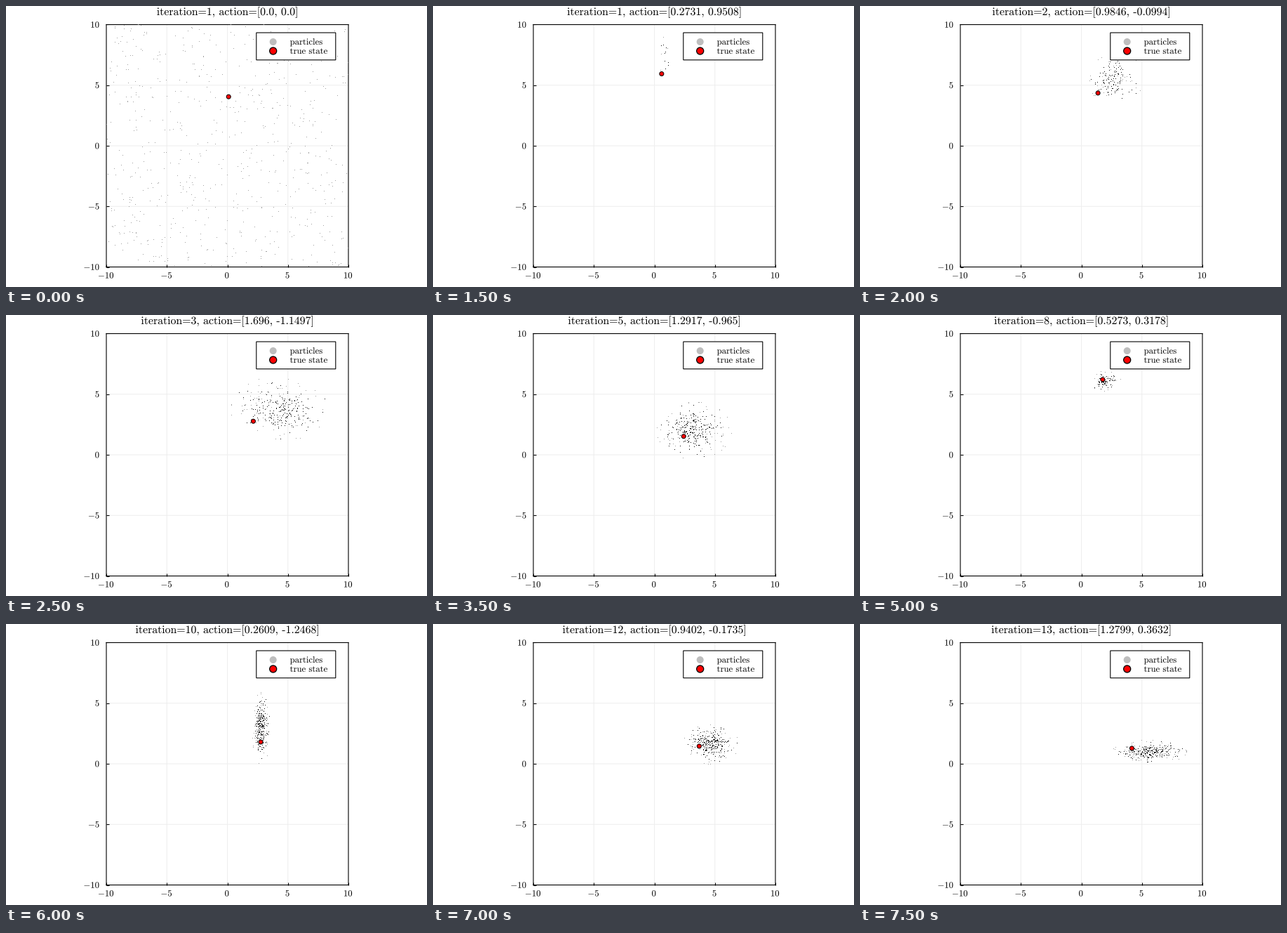
Write a matplotlib script that moves like this. It is 600 px wide and 400 px high and loops after 8 s.

```python
import numpy as np
import matplotlib as mpl
import matplotlib.pyplot as plt
from matplotlib.animation import FuncAnimation
from matplotlib.patches import Circle, Rectangle
from matplotlib.patheffects import Normal

mpl.rcParams.update({"mathtext.fontset": "cm", "path.snap": False})

W, H, DPI = 600, 400, 100
PT = 72 / DPI  # points per pixel
LEFT, TOP, SIDE = 143, 26.5, 345
UNIT = SIDE / 20
GREY, DARK = "#a0a0a0", "#111111"
HOLD = 3  # ticks spent on the first step
FRAMES = 16

# Key points of the run: step, action, true state, centre of the cloud
KEYS = np.array([
    (0, 0, 0, 0.1, 4.05, 0, 0),
    (1, 0.2731, 0.9508, 0.6, 5.94, 0.9, 7.3),
    (3, 1.696, -1.1497, 2.14, 2.77, 4.3, 3.7),
    (6, 1.0896, -0.8726, 2.56, 0.9, 2.75, 1.1),
    (8, 0.5273, 0.3178, 1.76, 6.21, 1.95, 6.0),
    (10, 0.2609, -1.2468, 2.76, 1.8, 2.75, 2.85),
    (13, 1.2799, 0.3632, 4.17, 1.28, 5.6, 0.95)])


def between(step, cols):
    return np.array([np.interp(step, KEYS[:, 0], c) for c in cols.T])


def cloud(step):
    """Particle positions, and which of them are dark."""
    rng = np.random.default_rng(40 + step)
    if step == 0:
        return rng.uniform(-10, 10, (620, 2)), np.zeros(620, bool)
    mean = between(step, KEYS[:, 5:7])
    # a stronger action scatters the particles more
    spread = 0.05 + 0.85 * between(step, abs(KEYS[:, 1:3]))
    # fewer distinct particles survive resampling near the top
    n = int(300 / (1 + np.exp(1.6 * (mean[1] - 5.4))))
    z = rng.normal(size=(n, 2))
    r = np.hypot(*z.T)
    z *= np.minimum(1, 2.7 / r)[:, None]
    return mean + z * spread, rng.random(n) < np.exp(-r**2 / 5)


def to_px(x, y):
    return LEFT + (x + 10) * UNIT, TOP + (10 - y) * UNIT


fig = plt.figure(figsize=(W / DPI, H / DPI), dpi=DPI, facecolor="white")
ax = fig.add_axes([LEFT / W, 1 - (TOP + SIDE) / H, SIDE / W, SIDE / H])
ax.set(xlim=(-10, 10), ylim=(-10, 10))
ax.set_axisbelow(True)
ticks = range(-10, 11, 5)
ax.set_xticks(ticks, [""] * 5)
ax.set_yticks(ticks, [""] * 5)
ax.tick_params(direction="in", length=4 * PT, width=1.1 * PT)
ax.grid(color="#eeeeee", lw=PT)
for side in ax.spines.values():
    side.set_linewidth(1.1 * PT)

# overlay measured in pixels from the top left corner
hud = fig.add_axes([0, 0, 1, 1], zorder=2)
hud.set(xlim=(0, W), ylim=(H, 0))
hud.axis("off")


def tex(s):
    return rf"$\text{{{s}}}$"


def label(x, y, s, size=12.7, ha="left"):
    # the path effect draws outlines, so glyphs keep their exact places
    return hud.text(x, y, tex(s), fontsize=size * PT, ha=ha, va="baseline",
                    path_effects=[Normal()])


def disc(x, y, r, color, edge=0):
    return hud.add_patch(Circle((x, y), r, fc=color, ec="black" if edge else "none",
                                lw=edge * PT))


for v in ticks:
    s = str(v).replace("-", "\N{MINUS SIGN}")
    x, y = to_px(v, v)
    label(x, 387.5, s, ha="center")
    label(134.5, y + 4.2, s, ha="right")

state = disc(0, 0, 3, "red", 1)
hud.add_patch(Rectangle((356.8, 38), 113, 38.8, fc="white", ec="black", lw=1.1 * PT))
disc(380.7, 51, 5, "#bebebe")
disc(380.7, 64, 5, "red", 1.3)
label(404.6, 55, "particles")
label(404.6, 68, "true state")
title = label(315.7, 13, "", 15.8, "center")

pale, = ax.plot([], [], ",", color=GREY, zorder=3)
dark, = ax.plot([], [], ",", color=DARK, zorder=3)


def draw(i):
    step = max(0, i - HOLD + 1)
    pts, is_dark = cloud(step)
    dark.set_data(*pts[is_dark].T)
    pale.set_data(*pts[~is_dark].T)
    state.center = to_px(*between(step, KEYS[:, 3:5]))
    a, b = between(step, KEYS[:, 1:3]).round(4)
    title.set_text(tex(f"iteration={max(1, step)}, action=[{a}, {b}]"))
    return pale, dark, state, title


anim = FuncAnimation(fig, draw, frames=FRAMES, init_func=lambda: draw(0),
                     interval=500, repeat=True, repeat_delay=0)
plt.show()
```
